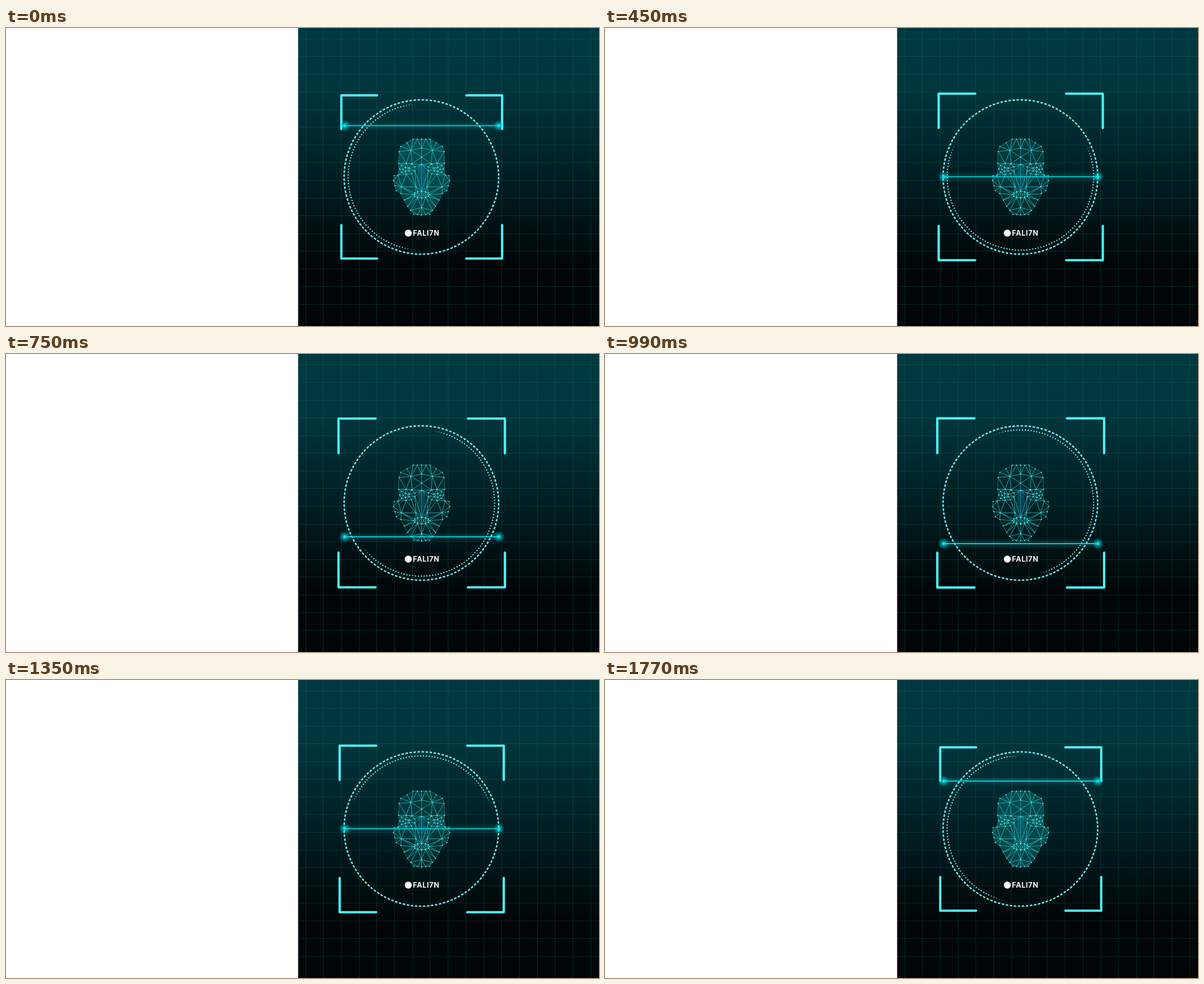
Write an HTML page with a canvas that moves like this. It is 1055 by 531 pixels and loops after 1.8 s.

```html
<!DOCTYPE html>
<html lang="en">
<head>
<meta charset="utf-8">
<title>Face scan</title>
<style>
  html, body { margin: 0; width: 100%; height: 100%; overflow: hidden; background: #fff; }
  canvas { display: block; }
</style>
</head>
<body>
<canvas id="stage" width="1055" height="531"></canvas>
<script>
const ctx = document.getElementById('stage').getContext('2d');
const LOOP = 1800, STEP = 30, TAU = Math.PI * 2;
const CX = 739.4, CY = 265.4, PANEL = 519.7;

// Points spaced evenly along an elliptical arc; a full turn does not repeat its first point.
function ring(cx, cy, rx, ry, count, from = 0, sweep = TAU) {
  const gaps = sweep < TAU ? count - 1 : count;
  return Array.from({ length: count }, (_, i) => {
    const a = from + sweep * i / gaps;
    return [cx + rx * Math.cos(a), cy + ry * Math.sin(a)];
  });
}

// Splits the longer edges of a path in the middle.
const subdivide = path => path.flatMap((p, i) => {
  const next = path[i + 1];
  if (!next || Math.hypot(next[0] - p[0], next[1] - p[1]) < 12) return [p];
  return [p, [(p[0] + next[0]) / 2, (p[1] + next[1]) / 2]];
});

// Right half of the head: x is the distance from the axis of symmetry.
const outline = subdivide([
  [0, 198], [15, 198], [37, 211], [40, 220], [42, 262], [49, 263],
  [50, 272], [45, 290], [37, 295], [25, 318], [14, 332], [0, 333]
]);
const points = [
  ...outline,
  [0, 214], [0, 230], [0, 243], [0, 320],           // axis
  [19, 218], [17, 242], [36, 283], [10, 283],       // forehead and cheek
  ...ring(25, 251, 14, 10, 9),                      // eye
  ...ring(27, 252, 6, 4, 5),
  ...ring(0, 297, 14, 6, 7, -TAU / 4, TAU / 2)      // mouth
];

const head = new Path2D();
outline.forEach(p => head.lineTo(...p));
head.closePath();
const mesh = triangulate(points);
const nose = new Path2D();
for (let i = 0; i < 4; i++) {
  nose.moveTo(i * 1.5, 243);
  nose.lineTo(i * 3, 291);
}

// Delaunay triangles whose centre lies inside the head.
function triangulate(pts) {
  const path = new Path2D();
  for (let i = 0; i < pts.length; i++)
    for (let j = i + 1; j < pts.length; j++)
      for (let k = j + 1; k < pts.length; k++) {
        const [ax, ay] = pts[i];
        const bx = pts[j][0] - ax, by = pts[j][1] - ay;
        const cx = pts[k][0] - ax, cy = pts[k][1] - ay;
        const det = 2 * (bx * cy - by * cx);
        if (Math.abs(det) < 1e-6) continue;
        const b = bx * bx + by * by, c = cx * cx + cy * cy;
        const ux = (cy * b - by * c) / det, uy = (bx * c - cx * b) / det;
        const limit = ux * ux + uy * uy - 1e-6;
        if (pts.some(([x, y]) => (x - ax - ux) ** 2 + (y - ay - uy) ** 2 < limit)) continue;
        if (!ctx.isPointInPath(head, ax + (bx + cx) / 3, ay + (by + cy) / 3)) continue;
        path.moveTo(...pts[i]);
        path.lineTo(...pts[j]);
        path.lineTo(...pts[k]);
        path.closePath();
      }
  return path;
}

function dot(x, y, r) {
  ctx.beginPath();
  ctx.arc(x, y, r, 0, TAU);
  ctx.fill();
}

function line(x1, y1, x2, y2) {
  ctx.beginPath();
  ctx.moveTo(x1, y1);
  ctx.lineTo(x2, y2);
  ctx.stroke();
}

function drawBackground() {
  ctx.fillStyle = '#fff';
  ctx.fillRect(0, 0, 1055, 531);
  const shade = ctx.createLinearGradient(0, 0, 0, 531);
  shade.addColorStop(0, '#003941');
  shade.addColorStop(.2, '#00363d');
  shade.addColorStop(.8, '#000607');
  ctx.fillStyle = shade;
  ctx.fillRect(PANEL, 0, 1055 - PANEL, 531);
  ctx.strokeStyle = 'rgba(20,125,120,.27)';
  ctx.lineWidth = 1;
  for (let i = 0; i < 17; i++) {
    const x = Math.floor(533 + i * 31.7) + .5;
    line(x, 0, x, 531);
  }
  for (let i = 0; i < 16; i++) {
    const y = Math.floor(19 + i * 31.57) + .5;
    line(PANEL, y, 1055, y);
  }
}

function drawHead(glow) {
  for (const side of [1, -1]) {
    ctx.save();
    ctx.translate(CX, 0);
    ctx.scale(side, 1);
    ctx.fillStyle = `rgba(0,112,114,${.52 * glow})`;
    ctx.fill(head);
    ctx.lineWidth = .55;
    ctx.strokeStyle = '#2cb6b8';
    ctx.stroke(mesh);
    ctx.strokeStyle = '#2594b8';
    ctx.stroke(nose);
    ctx.fillStyle = '#74f4f4';
    points.forEach(([x, y]) => dot(x, y, .95));
    ctx.restore();
  }
}

function drawRings(t) {
  ctx.strokeStyle = '#6becef';
  ctx.lineWidth = 2.6;
  const dash = TAU * 137.5 / 120;
  ctx.setLineDash([dash * .62, dash * .38]);
  ctx.beginPath();
  ctx.arc(739, 265.5, 137.5, 0, TAU);
  ctx.stroke();
  ctx.setLineDash([]);

  // Dotted arc: turns once per loop while its length swells and shrinks.
  const middle = 270.5 - t * 360 / LOOP;
  const half = (187 + 49 * Math.sin(TAU * (t - 95) / LOOP)) / 2;
  const count = 160;
  ctx.fillStyle = '#62e9ec';
  for (let i = 0; i < count; i++) {
    const offset = (i + .5) * 360 / count - 180;
    const alpha = Math.min(1, (half - Math.abs(offset)) / 12);
    if (alpha <= 0) continue;
    const angle = (middle + offset) * TAU / 360;
    ctx.globalAlpha = alpha;
    dot(739 + 130.3 * Math.sin(angle), 265.5 - 130.3 * Math.cos(angle), 1.2);
  }
  ctx.globalAlpha = 1;
}

function drawBrackets(swing) {
  const scale = 1 + .042 * swing;
  ctx.strokeStyle = '#4cf8fb';
  ctx.lineWidth = 4;
  ctx.lineCap = ctx.lineJoin = 'round';
  for (const sx of [-1, 1]) for (const sy of [-1, 1]) {
    ctx.save();
    ctx.translate(CX + .2, CY);
    ctx.scale(sx * scale, sy * scale);
    ctx.beginPath();
    ctx.moveTo(79.3, 145.3);
    ctx.lineTo(143, 145.3);
    ctx.lineTo(143, 85.5);
    ctx.stroke();
    ctx.restore();
  }
  ctx.lineCap = 'butt';
  ctx.lineJoin = 'miter';
}

function drawScanner(swing) {
  const y = 174 + 182 * swing;
  const ends = [602.5, 877];
  for (const x of ends) {
    const halo = ctx.createRadialGradient(x, y, 2, x, y, 10);
    halo.addColorStop(0, 'rgba(0,228,240,.6)');
    halo.addColorStop(1, 'rgba(0,228,240,0)');
    ctx.fillStyle = halo;
    dot(x, y, 10);
  }
  ctx.save();
  ctx.shadowColor = '#00e4f0';
  ctx.shadowBlur = 8;
  ctx.strokeStyle = ctx.fillStyle = '#04e4ea';
  ctx.lineWidth = 1.7;
  line(ends[0], y, ends[1], y);
  ends.forEach(x => dot(x, y, 2.6));
  ctx.restore();
}

function drawLabel() {
  ctx.fillStyle = '#fff';
  dot(715.7, 365.5, 6.2);
  ctx.font = '700 12.5px Inter, sans-serif';
  ctx.letterSpacing = '0.7px';
  ctx.fillText('FALI7N', 724, 370.2);
}

function render() {
  const t = Math.floor(performance.now() % LOOP / STEP) * STEP;
  const swing = 1 - Math.abs(1 - t / (LOOP / 2));
  drawBackground();
  drawHead(1 - swing);
  drawRings(t);
  drawLabel();
  drawBrackets(swing);
  drawScanner(swing);
  requestAnimationFrame(render);
}
render();
</script>
</body>
</html>
```
